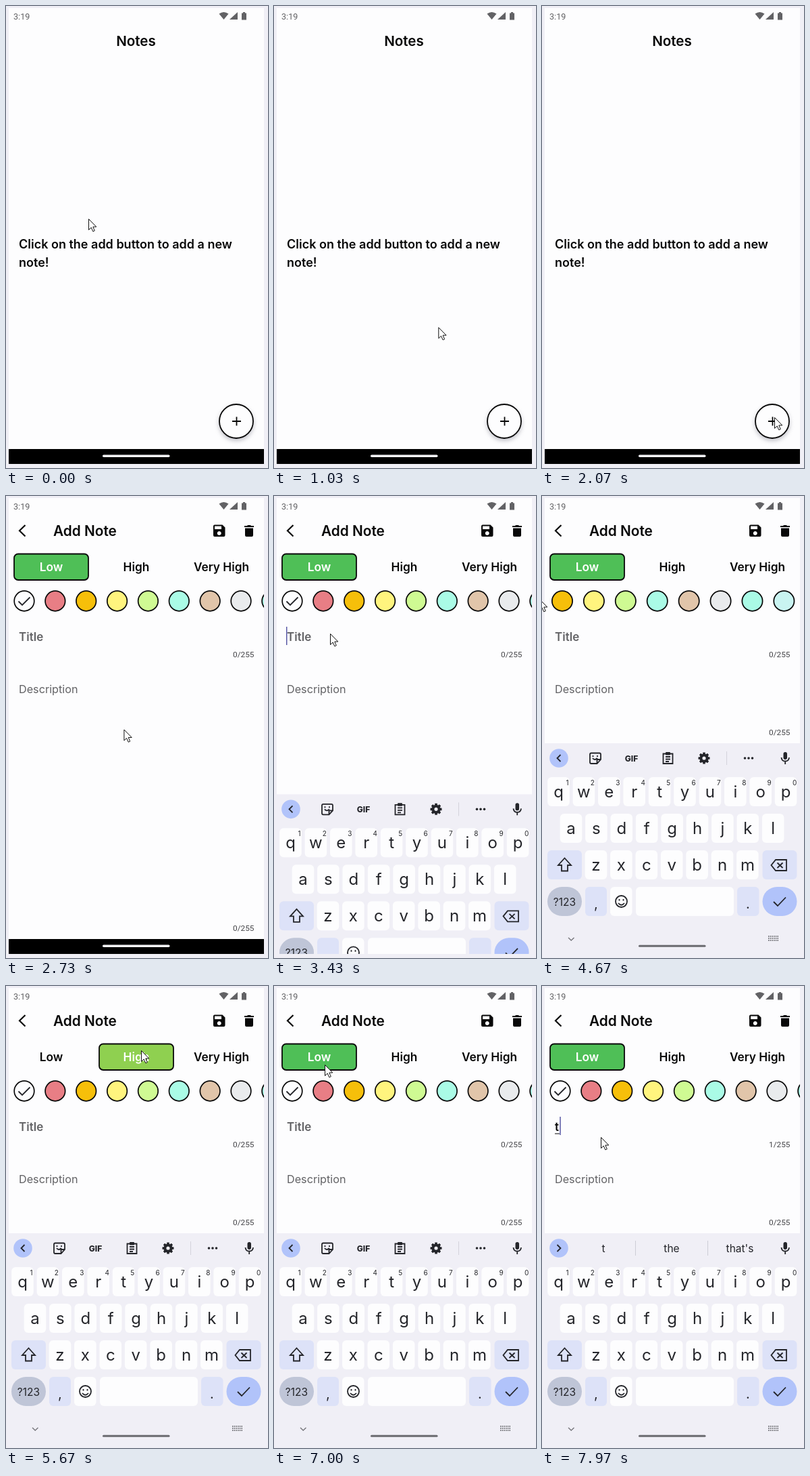
These frames come from a looping animation (388 by 682 pixels, 8000 ms). An HTML page:

```html
<!DOCTYPE html>
<html lang="en">
<head>
<meta charset="utf-8">
<title>Notes</title>
<style>
html, body { margin: 0; width: 100%; height: 100%; overflow: hidden; background: #f0eff6; }
svg { display: block; width: 388px; height: 682px; font-family: Inter, sans-serif; }
.b { font-weight: 600; }
.x { font-weight: 800; }
.r { font-family: Roboto, sans-serif; }
.m { text-anchor: middle; }
.e { text-anchor: end; }
.line { fill: none; stroke: #24252a; stroke-width: 1.8; }
</style>
</head>
<body>
<svg id="stage" viewBox="0 0 388 682"></svg>
<script>
const LOOP = 8000;
const EDGE = '#f0eff6', PAPER = '#fdfdfe', INK = '#080808', GREY = '#626265', KEY = '#fdfdfe', DARK = '#24252a';

const text = (x, y, size, s, cls = '', fill = INK, id = '') =>
  `<text x="${x}" y="${y}" font-size="${size}" class="${cls}" fill="${fill}" id="${id}">${s}</text>`;
const rect = (x, y, w, h, fill, r = 0, extra = '') =>
  `<rect x="${x}" y="${y}" width="${w}" height="${h}" rx="${r}" fill="${fill}" ${extra}/>`;
const path = (d, fill = INK, extra = '') => `<path d="${d}" fill="${fill}" ${extra}/>`;
const line = (d, extra = '') => `<path d="${d}" class="line" ${extra}/>`;
const at = (x, y, s, id = '') => `<g transform="translate(${x} ${y})" id="${id}">${s}</g>`;

function statusBar() {
  return text(11, 20, 12.6, '3:19', 'r', GREY) +
    path('M315.500 11.500Q322.500 6.500 329.500 11.500L322.500 20Z', GREY) +
    path('M331 20L343 9V20Z', GREY) +
    path('M349 10.500H351V9H354V10.500H356V20.500H349Z', GREY);
}

function notesPage() {
  return text(192.5, 58.5, 20.6, 'Notes', 'b m') +
    text(19, 358, 18, 'Click on the add button to add a new', 'b') +
    text(19, 384.5, 18, 'note!', 'b') +
    `<circle cx="341" cy="616" r="26" fill="#a9a9b2" opacity=".7" filter="url(#soft)"/>
     <circle cx="341" cy="613" r="25" fill="${PAPER}" stroke="${INK}" stroke-width="1.8"/>` +
    path('M335 613H348M341.500 606.500V619.500', 'none', `stroke="${INK}" stroke-width="1.8"`);
}

const LEVELS = [['Low', 67, '#4fbf57'], ['High', 193, '#8fd050'], ['Very High', 319, '#f4534a']];
const CHIPS = [PAPER, '#e87e85', '#f6bf0a', '#fff47e', '#cffa93', '#aafbe6', '#e1c5aa', '#e9ebed', '#aafbe6', '#c9f4f1'];

function addPage() {
  const levels = LEVELS.map(([name, x, fill], i) =>
    rect(x - 55, 85.500, 110, 38.500, fill, 6, `id="box${i}" stroke="${INK}" stroke-width="1.8"`) +
    text(x, 110.500, 17.3, name, 'b m', INK, 'level' + i)).join('');
  const chips = CHIPS.map((c, i) =>
    `<circle cx="${27 + 45.86 * i}" cy="155" r="14.800" fill="${c}" stroke="${INK}" stroke-width="1.7"/>`).join('');
  return line('M28.500 43L20 51.300L28.500 59.500', 'style="stroke-width:2.200;stroke:#080808"') +
    text(70, 58.5, 20.8, 'Add Note', 'b') +
    path('M309 42.500H320.500L324.500 46.500V58Q324.500 60 322.500 60H309Q307 60 307 58V44.500Q307 42.500 309 42.500ZM309 44.500V49H319V44.500ZM315.700 52A3 3 0 1 0 315.800 52Z', INK, 'fill-rule="evenodd"') +
    path('M353 44H357L358 43H362L363 44H367V46H353ZM354 47.500H366V58Q366 60 364 60H356Q354 60 354 58Z') +
    levels +
    `<g clip-path="url(#screen)"><g id="chips">${chips}` +
    line('M18.500 155.500L24 161L35.500 149.500') + '</g></g>' +
    text(19, 213.5, 17, 'Title', 'b', GREY, 'hint') +
    text(19, 213.5, 17, 't', 'b', INK, 'typed') +
    rect(19, 217.5, 7, 1, INK, 0, 'id="under"') +
    rect(18, 193, 1.5, 27, '#5a5aa6', 0, 'id="caret"') +
    text(367.5, 238, 11.8, '0/255', 'r e', '#444448', 'count') +
    text(19, 291, 16.2, 'Description', '', GREY) +
    text(367.5, 352.5, 11.8, '0/255', 'r e', '#444448', 'count2');
}

function toolbar() {
  const teeth = Array.from({ length: 8 }, (_, i) =>
    rect(-1.8, -8.5, 3.6, 5, DARK, 0.5, `transform="rotate(${i * 45})"`)).join('');
  return line('M27.500 382L22.500 387L27.500 392') +
    line('M73 379.500H85Q87 379.500 87 381.500V389L81.500 395H73Q71 395 71 393V381.500Q71 379.500 73 379.500ZM87 389H81.500V395') +
    line('M75 387Q78 391 82 387M75.500 383V385M82 383V385') +
    text(132.5, 391.5, 12, 'GIF', 'x m', DARK) +
    line('M179.500 380.500H193.500V395H179.500ZM183 385H190M183 388.500H190M183 392H188') +
    rect(183, 378, 7, 4.5, DARK, 1) +
    at(240, 387, teeth + `<circle r="4.600" fill="none" stroke="${DARK}" stroke-width="4"/>`) +
    rect(273, 377, 1, 20, '#d3d3db') +
    [300.5, 306, 311.5].map(x => `<circle cx="${x}" cy="387" r="1.800" fill="${DARK}"/>`).join('');
}

function suggestions() {
  return line('M22.500 382L27.500 387L22.500 392') +
    ['t', 'the', 'that\'s'].map((s, i) => text(91 + 101 * i, 393, 15.5, s, 'm', DARK)).join('') +
    rect(138, 376, 1, 22, '#cdcdd6') + rect(245, 376, 1, 22, '#cdcdd6');
}

function keyboard() {
  const key = (x, y, w, fill = KEY, r = 6) => rect(x, y, w, 43, fill, r);
  const row = (letters, x0, y) => [...letters].map((c, i) => {
    const x = x0 + 37.4 * i;
    return key(x - 16.3, y, 32.6) + text(x, y + 30, 24, c, 'm', DARK);
  }).join('');
  const digits = [...'1234567890'].map((d, i) => text(37.5 + 37.4 * i, 426.5, 10, d, 'm', DARK)).join('');
  const SIDE = '#dde2f8', BLUE = '#b1c3fa';
  return rect(4, 365, 378, 317, EDGE) +
    `<circle cx="25" cy="387" r="13.800" fill="${BLUE}"/>` +
    `<g id="tools">${toolbar()}</g><g id="words">${suggestions()}</g>` +
    rect(357.5, 378, 5.5, 11, DARK, 2.7) +
    line('M354.500 386Q355 391.500 360.200 391.500Q365.500 391.500 366 386M360.200 391.500V396') +
    row('qwertyuiop', 24.5, 415) + digits + row('asdfghjkl', 43, 469) + row('zxcvbnm', 80, 523) +
    key(8, 523, 51, SIDE) + line('M33.500 534.500L43 545H38V553.500H29V545H24Z') +
    key(326.500, 523, 51, SIDE) +
    line('M346 537H362V553H346L339.500 545ZM348.500 541.500L356.500 549M356.500 541.500L348.500 549') +
    key(8, 577, 51, '#bfc5d7', 21.5) + text(33.5, 605, 15.5, '?123', 'm', DARK) +
    key(64, 577, 32, SIDE) + text(80, 609, 20, ',', 'm', DARK) +
    key(101, 577, 32.5) + '<circle cx="117.500" cy="598.500" r="8.500" class="line"/>' +
    line('M113 601Q117.500 606.500 122 601M114.500 595V597.500M120.500 595V597.500') +
    key(139, 577, 145) + key(289, 577, 32.5, SIDE) + text(305, 609, 20, '.', 'm', DARK) +
    key(326.500, 577, 51, BLUE, 21.5) + line('M343 599L349 605L361 592.500') +
    line('M39 652L43.200 656L47.500 652', 'style="stroke:#77777c;stroke-width:1.400"') +
    [650, 653, 656].map(y => line(`M335 ${y}H350`, 'style="stroke:#77777c;stroke-dasharray:1.500 1.200"')).join('') +
    rect(143, 662.7, 99.5, 3, '#6b6b70', 1.5);
}

const stage = document.getElementById('stage');
stage.innerHTML = `<defs>
  <clipPath id="screen"><rect x="4" y="3" width="378" height="673"/></clipPath>
  <filter id="soft" x="-40%" y="-40%" width="180%" height="180%"><feGaussianBlur stdDeviation="3"/></filter>
</defs>` +
  rect(0, 0, 388, 682, EDGE) + rect(4, 3, 378, 673, PAPER) + statusBar() +
  `<g id="notes">${notesPage()}</g><g id="add">${addPage()}</g>` +
  rect(4, 654, 378, 22, '#000') + rect(143, 662.5, 99.5, 3.5, '#f4f4f8', 1.7) +
  `<g clip-path="url(#screen)"><g id="keys">${keyboard()}</g></g>` +
  at(0, 0, path('M.5 .5V16.500L4.200 13L6.800 18.800L9.300 17.700L6.800 12H11.800Z', '#fff',
    'stroke="#111" stroke-width="1" stroke-linejoin="round"'), 'mouse');

const el = {};
stage.querySelectorAll('[id]').forEach(n => { if (n.id) el[n.id] = n; });

// Mouse stops: time, x, y
const STOPS = [
  [0, 122, 314], [500, 122, 314], [1500, 344, 607], [2250, 344, 607], [3050, 83, 203],
  [3700, 83, 203], [4150, 250, 152], [4250, 250, 152], [4640, -4, 152], [4950, -4, 152],
  [5220, 150, 155], [5350, 150, 155], [5580, 200, 95], [5850, 200, 95], [6150, 318, 100],
  [6500, 318, 100], [6850, 75, 116], [7100, 75, 116], [7450, 87, 223], [LOOP, 87, 223]
];

const ramp = (t, a, b) => Math.min(1, Math.max(0, (t - a) / (b - a)));
const smooth = u => u * u * (3 - 2 * u);
const ease = (t, a, b) => smooth(ramp(t, a, b));
const move = (n, x, y) => n.setAttribute('transform', `translate(${x.toFixed(2)} ${y.toFixed(2)})`);
const show = (n, on) => n.setAttribute('opacity', +on);

function draw(t) {
  const i = STOPS.findIndex((s, k) => k && t <= s[0]);
  const [a, b] = [STOPS[i - 1], STOPS[i]];
  const u = ease(t, a[0], b[0]);
  move(el.mouse, a[1] + (b[1] - a[1]) * u, a[2] + (b[2] - a[2]) * u);

  show(el.notes, 1 - ramp(t, 2180, 2420));
  show(el.add, ramp(t, 2230, 2500));

  const level = t < 5600 ? 0 : t < 6200 ? 1 : t < 6870 ? 2 : 0;
  LEVELS.forEach((_, k) => {
    show(el['box' + k], k === level);
    el['level' + k].setAttribute('fill', k === level ? '#fff' : INK);
  });

  // Overscroll stretches the row away from its right end
  const scroll = 81 * (ease(t, 4280, 4500) - ease(t, 5000, 5210));
  const k = 1 + 0.023 * (ease(t, 4450, 4640) - ease(t, 4950, 5020));
  el.chips.setAttribute('transform',
    `translate(374 155) scale(${k} 1) translate(${-374 - scroll} -155)`);

  move(el.keys, 0, 317 * (1 - ramp(t, 3345, 3630)) ** 4);
  show(el.keys, t >= 3345);
  move(el.count2, 0, t < 3560 ? 289 : 0);

  const typed = t >= 7890;
  show(el.typed, typed);
  show(el.under, typed);
  show(el.hint, 1 - ramp(t, 7890, 7960));
  show(el.tools, !typed);
  show(el.words, typed);
  el.count.textContent = typed ? '1/255' : '0/255';
  const since = typed ? 0 : t < 7450 ? t - 3100 : t - 7450;
  show(el.caret, since >= 0 && since % 1000 < 500);
  el.caret.setAttribute('x', typed ? 26.3 : 18);
}

function tick() {
  draw(performance.now() % LOOP);
  requestAnimationFrame(tick);
}
tick();
</script>
</body>
</html>
```
